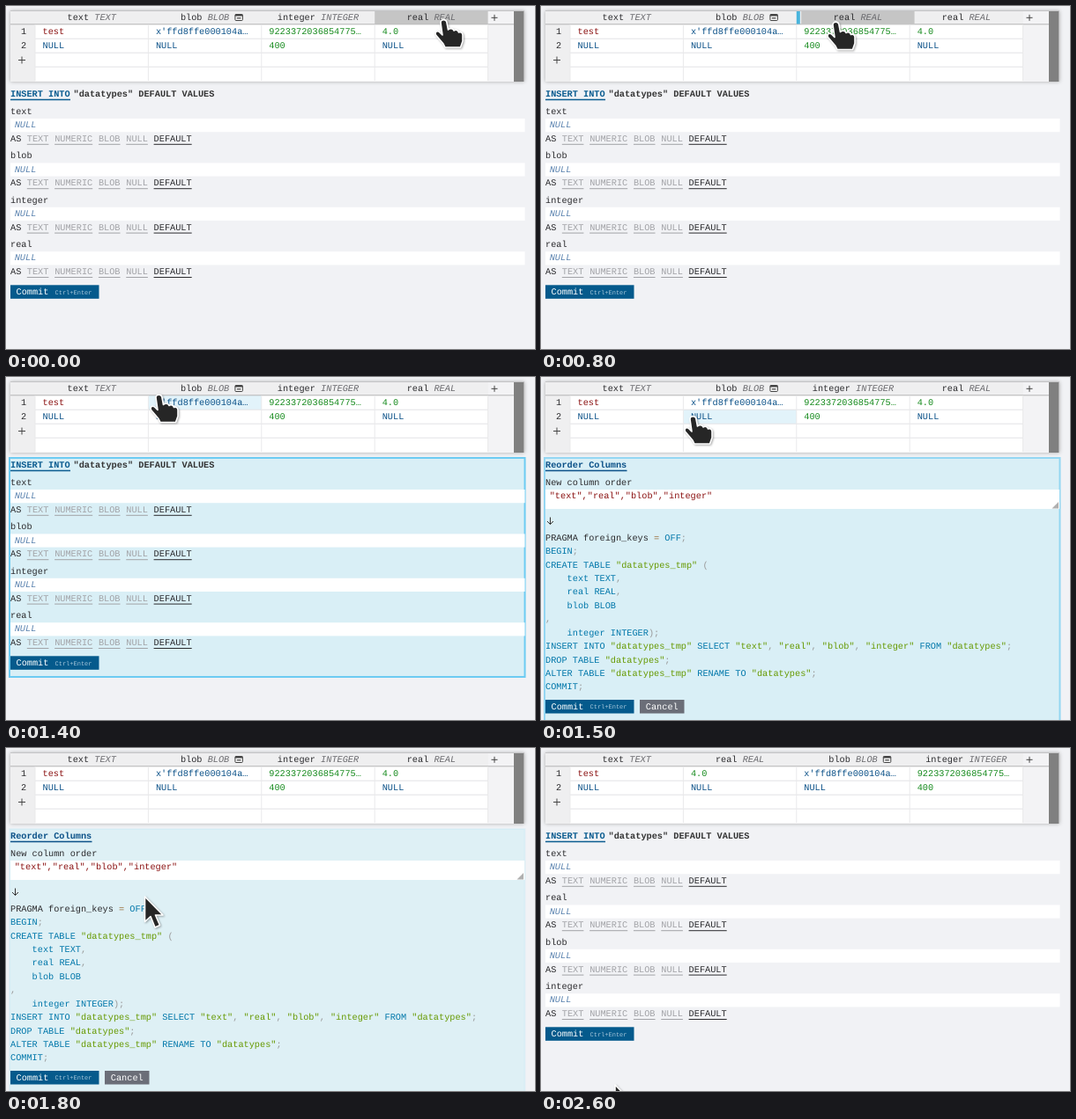
An HTML page for the animation above (3400 ms loop, 600x390 px).

```html
<!DOCTYPE html>
<html lang="en">
<head>
<meta charset="utf-8">
<title>Reorder columns</title>
<style>
  html, body { margin: 0; width: 100%; height: 100%; overflow: hidden; background: #f1f2f5; }
  svg { display: block; }
  text { font: 10.26px "Liberation Mono", monospace; white-space: pre; text-rendering: geometricPrecision; }
  .b { font-weight: bold; }
  .i { font-style: italic; }
  .s { font-size: 7px; }
</style>
</head>
<body>
<svg id="stage" width="600" height="390" viewBox="0 0 600 390"></svg>
<script>
const LOOP = 3400, STEP = 100, LAST = 2600;
const DRAG = 500, DROP = 1400, OPEN = 1500, DONE = 2500;
const CH = 6.157, LEFT = 33, COL = 128.4, GRAB = 458;
const INK = '#2b2b2e', BLUE = '#0b5188', RED = '#8b1212', GREEN = '#158a1c';

// time, x, y of the pointer
const PATH = [
  [0, 497, 16], [400, 466, 16.5], [500, 458, 17], [600, 445, 17], [700, 400, 18],
  [800, 335, 18.5], [900, 265, 19], [1000, 212, 19], [1100, 187, 19.5], [1300, 176, 20],
  [1400, 174, 20.5], [1500, 173, 45], [1600, 170, 88], [1700, 166, 123],
  [1900, 149, 215], [2200, 107, 340], [2400, 84, 380], [2600, 84, 383]
];

const COLUMNS = {
  text: [['test', RED], ['NULL', BLUE]],
  blob: [["x'ffd8ffe000104a…", BLUE], ['NULL', BLUE]],
  integer: [['9223372036854775…', GREEN], ['400', GREEN]],
  real: [['4.0', GREEN], ['NULL', BLUE]]
};

const SQL = `PRAGMA foreign_keys = OFF;
BEGIN;
CREATE TABLE "datatypes_tmp" (
    text TEXT,
    real REAL,
    blob BLOB
,
    integer INTEGER);
INSERT INTO "datatypes_tmp" SELECT "text", "real", "blob", "integer" FROM "datatypes";
DROP TABLE "datatypes";
ALTER TABLE "datatypes_tmp" RENAME TO "datatypes";
COMMIT;`.split('\n');

const rect = (x, y, w, h, fill, more = '') =>
  `<rect x="${x}" y="${y}" width="${w}" height="${h}" fill="${fill}" ${more}/>`;
const text = (x, y, s, fill = INK, cls = '') =>
  `<text x="${x}" y="${y}" fill="${fill}" class="${cls}">${s}</text>`;
const path = (d, more) => `<path d="${d}" ${more}/>`;
const line = (d, stroke, width = 1) => path(d, `fill="none" stroke="${stroke}" stroke-width="${width}"`);
const clamp = v => Math.max(0, Math.min(1, v));
const colX = i => LEFT + COL * i;

function pointerAt(t) {
  const k = Math.max(1, PATH.findIndex(p => p[0] >= t));
  const [t0, x0, y0] = PATH[k - 1], [t1, x1, y1] = PATH[k];
  const f = (t - t0) / (t1 - t0);
  return { x: x0 + (x1 - x0) * f, y: y0 + (y1 - y0) * f };
}

function header(name, x) {
  const start = x + (COL - (name.length * 2 + 1) * CH) / 2;
  const icon = name === 'blob'
    ? rect(start + 62, 9.5, 8.5, 7, '#f4f4f4', 'rx="1" stroke="#444"') +
      rect(start + 62, 9.5, 8.5, 2, '#444') + rect(start + 64, 13, 4.5, 1.5, '#666')
    : '';
  return text(start, 16, name) +
    text(start + (name.length + 1) * CH, 16, name.toUpperCase(), '#6a6a6e', 'i') + icon;
}

function table(order, t, p) {
  const dragging = t >= DRAG && t < DROP;
  const hover = Math.floor((p.x - LEFT) / COL);
  let s = rect(5, 5.5, 583, 80.5, '#efeff0', 'style="filter:drop-shadow(0 0 2px #aaa)"') +
    rect(LEFT, 21, COL * 4, 64.5, '#fff') + rect(547, 6, 29, 80, '#f3f3f5') +
    rect(576, 6, 11.5, 80, '#808080');
  if (!dragging && p.y < 53) {
    s += p.y < 20 ? rect(colX(hover), 6, COL, 14.5, '#c5c5c5')
      : rect(colX(hover), p.y < 37 ? 21 : 37, COL, 16, '#e2f3fa');
  }
  s += line('M5 5.5H588', '#c4c4c6') + line('M5 20.8H576', '#b4b4b6');
  for (const y of [37, 53, 69]) s += line(`M33 ${y}.2H547`, '#e3e3e5');
  for (const i of [0, 1, 2, 3, 4]) s += line(`M${colX(i)} 21V85`, '#e9e9eb');
  order.forEach((name, i) => {
    s += header(name, colX(i));
    COLUMNS[name].forEach(([value, color], row) => s += text(colX(i) + 8.5, 32 + 16.3 * row, value, color));
  });
  s += text(17, 32, '1') + text(17, 48.3, '2') +
    line('M14 61.5H22M18 57.5V65.5M550.5 13.3H557.5M554 9.8V16.8', '#444');
  if (dragging) {
    const x = colX(3) + p.x - GRAB;
    s += rect(x, 6, COL, 14.5, '#c5c5c5') + header('real', x);
    if (hover < 3) s += rect(colX(hover), 6, 4, 14.5, '#48b4dc');
  }
  return s;
}

const commit = y => rect(5, y, 100.5, 15.5, '#055a8c') +
  text(11.5, y + 10.8, 'Commit', '#fff') + text(55.5, y + 10.3, 'Ctrl+Enter', '#a5c6da', 's');

function insertForm(order) {
  let s = text(5, 103, 'INSERT INTO', '#0a5c90', 'b') + line('M5 106.5H73', '#0a5c90', 1.3) +
    text(76.5, 103, '"datatypes" DEFAULT VALUES', '#333', 'b');
  order.forEach((name, i) => {
    const y = 123 + 50.4 * i;
    s += text(5, y, name) + rect(5, y + 5, 583.5, 15.2, '#fff') +
      text(9.7, y + 15.2, 'NULL', '#5c84b0', 'i') + text(5, y + 30.7, 'AS');
    let x = 23.8;
    for (const option of ['TEXT', 'NUMERIC', 'BLOB', 'NULL', 'DEFAULT']) {
      const w = option.length * CH, color = option === 'DEFAULT' ? INK : '#a2a3a7';
      s += text(x, y + 30.7, option, color) + line(`M${x} ${y + 34.3}h${w}`, color);
      x += w + 6.7;
    }
  });
  return s + commit(317.3);
}

function highlight(code) {
  return code.replace(/PRAGMA foreign_keys|"[^"]*"|=|[;,()]|\w+/g, token => {
    const color = /^P/.test(token) ? INK : token[0] === '"' ? '#690'
      : token === '=' ? '#9a6e3a' : /\w/.test(token) ? '#07a' : '#999';
    return `<tspan fill="${color}">${token}</tspan>`;
  });
}

function reorderForm() {
  return text(5, 103, 'Reorder Columns', BLUE, 'b') + line('M5 106.5H97.5', BLUE, 1.3) +
    text(5, 123, 'New column order') + rect(5, 128, 583, 22, '#fff') +
    text(9.7, 138.2, '"text","real","blob","integer"', RED) +
    path('M587 142V149.5H579.5Z', 'fill="#b0b0b0"') +
    line('M10.5 159.5V167.5M7 164L10.5 167.5L14 164', '#333') +
    SQL.map((code, i) => text(5, 185.8 + 15.42 * i, highlight(code))).join('') +
    commit(367) + rect(112, 367, 50.5, 15.5, '#6b6e78') + text(118.8, 377.8, 'Cancel', '#fff');
}

function flash(t) {
  if (t < DROP || t >= 2100) return '';
  const h = t < OPEN ? 249 : 310;
  const fill = clamp((2100 - t) / 400), edge = Math.max(.12, 1 - (t - DROP) / 300) * fill;
  return rect(4, 92, 584.5, h, '#d9eff6', `fill-opacity="${fill}" stroke="#6ccbf2" stroke-width="2" stroke-opacity="${edge}"`);
}

const HAND = 'M-4 3C-4 -1.5 2.5 -1.5 3 3L4.5 11C6.5 9 10 9.5 11 12C13 10.5 16 11.5 16.5 14C18.5 13 21 14.5 21 17V24L18.5 31H1L-1 27L-9.5 17C-11 13 -7.5 11.5 -5 14L-2 17Z';
const ARROW = 'M0 0V28.5L6.5 22.5L11.5 35L17 32.5L12 21H20.5Z';
const BEAM = 'M-4.5 -15Q-1 -15 0 -13Q1 -15 4.5 -15M0 -13V13M-4.5 15Q-1 15 0 13Q1 15 4.5 15';

function pointer(p, editing) {
  const onButton = editing && p.y > 367 && p.y < 382.5;
  const onText = editing && (p.y > 128 && p.y < 150 || p.y > 176 && p.y < 358);
  const shape = onText
    ? line(BEAM, '#fff', 4) + line(BEAM, '#222', 2)
    : path(p.y < 86 || onButton ? HAND : ARROW,
        'fill="#262626" stroke="#fff" stroke-width="1.6" stroke-linejoin="round"');
  return `<g transform="translate(${p.x} ${p.y})" style="filter:drop-shadow(1px 1px 1px #0005)">${shape}</g>`;
}

function render(t) {
  const p = pointerAt(t), editing = t >= OPEN && t < DONE;
  const order = t < DONE ? ['text', 'blob', 'integer', 'real'] : ['text', 'real', 'blob', 'integer'];
  return table(order, t, p) + flash(t) + (editing ? reorderForm() : insertForm(order)) + pointer(p, editing);
}

const stage = document.getElementById('stage');
let shown = -1;
function tick() {
  const t = Math.min(LAST, Math.floor(performance.now() % LOOP / STEP) * STEP);
  if (t !== shown) stage.innerHTML = render(shown = t);
  requestAnimationFrame(tick);
}
tick();
</script>
</body>
</html>
```
